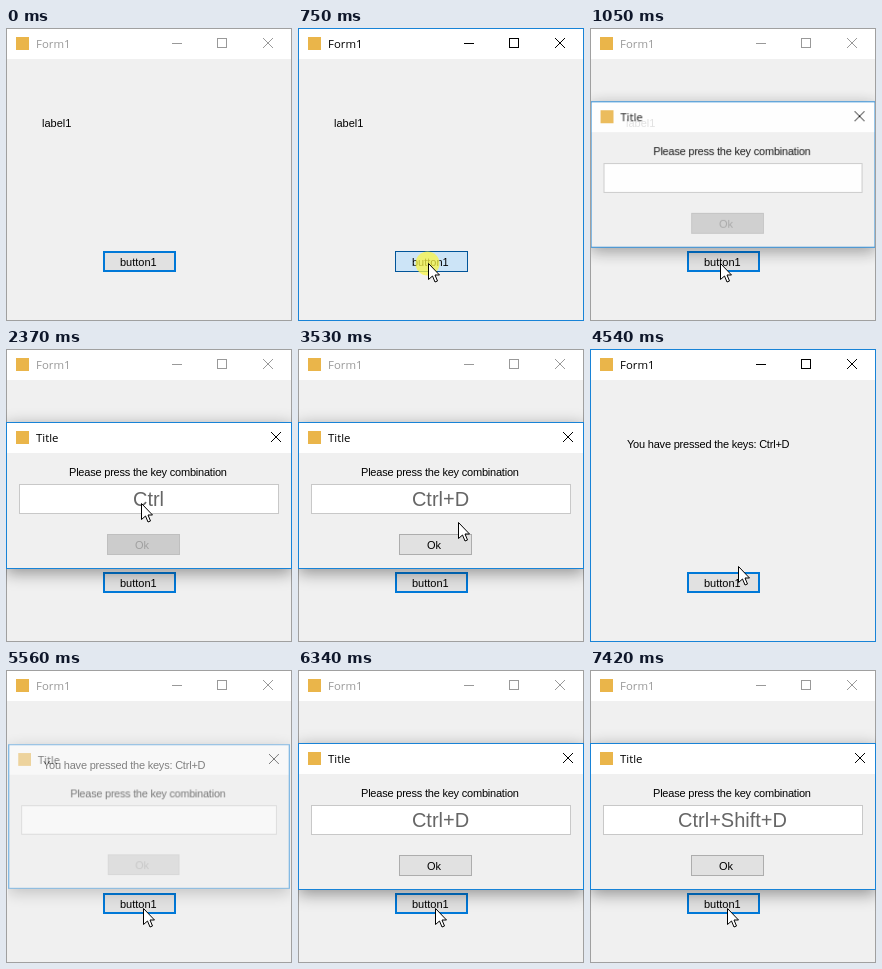
Recreate the animation shown at these times as an HTML page with a canvas. Size 286 by 293 pixels, loop 8000 ms.

```html
<!DOCTYPE html>
<html lang="en">
<head>
<meta charset="utf-8">
<title>Key combination dialog</title>
<style>
html, body { margin: 0; width: 286px; height: 293px; overflow: hidden; }
canvas { display: block; }
</style>
</head>
<body>
<canvas id="stage" width="286" height="293"></canvas>
<script>
const W = 286, H = 293, LOOP = 8000;
const stage = document.getElementById('stage').getContext('2d');
const layer = new OffscreenCanvas(W, H).getContext('2d');
let g = stage;

const SANS = '"Liberation Sans", Arial, sans-serif';
const SMALL = '11px ' + SANS, BIG = '20px ' + SANS;
const TITLE = '11.4px "Open Sans", "Noto Sans", sans-serif';
const BLUE = '#0078d7', FACE = '#f0f0f0';

// The screen refreshes on a fixed beat; everything below is timed in beats.
const BEAT = 77.6, FIRST = 186;
const beatAt = ms => Math.floor((ms - FIRST) / BEAT);

const CLICK = { open: 7, ok: 48, reopen: 65 };
const OPEN = 8.7, CLOSE = 49.2, REOPEN = 67.7, FADE = 2.6;
const moves = [
  { from: 0, to: 5, x: 130, y: 235 },
  { from: 14, to: 22, x: 135, y: 154 },
  { from: 42, to: 44, x: 184, y: 191 },
  { from: 45, to: 47, x: 150, y: 189 },
  { from: 53, to: 56, x: 148, y: 217 },
  { from: 61, to: 63, x: 137, y: 238 }
];
const typed = { 28: 'Ctrl', 34: 'Ctrl+D', 52: '', 79: 'Ctrl+D', 89: 'Ctrl+Shift', 93: 'Ctrl+Shift+D' };

const clamp = v => Math.max(0, Math.min(1, v));
const ease = u => u * u * (3 - 2 * u);
const within = (v, a, b) => v >= a && v < b;

function pointerAt(beat) {
  let x = 167, y = 270;
  for (const m of moves) {
    const k = ease(clamp((beat - m.from) / (m.to - m.from)));
    x += (m.x - x) * k;
    y += (m.y - y) * k;
  }
  return [Math.round(x), Math.round(y)];
}

function dialogAlpha(beat) {
  const ramp = start => clamp((beat - start) / FADE);
  return ramp(OPEN) - ramp(CLOSE) + ramp(REOPEN);
}

function keysAt(beat) {
  const last = Object.keys(typed).filter(at => at <= beat).pop();
  return typed[last] || '';
}

function box(x, y, w, h, fill, edge, line = 1) {
  g.fillStyle = edge;
  g.fillRect(x, y, w, h);
  g.fillStyle = fill;
  g.fillRect(x + line, y + line, w - 2 * line, h - 2 * line);
}

function text(str, x, y, font, color = '#000', align = 'left', spacing = 0) {
  g.font = font;
  g.fillStyle = color;
  g.textAlign = align;
  g.letterSpacing = spacing + 'px';
  g.fillText(str, x, y);
}

const label = (str, x, y) => text(str, x, y, SMALL, '#000', 'left', -0.21);

function cross(x, y) {
  g.beginPath();
  g.moveTo(x, y);
  g.lineTo(x + 10, y + 10);
  g.moveTo(x + 10, y);
  g.lineTo(x, y + 10);
  g.stroke();
}

function titleBar(y, name, ink) {
  g.fillStyle = '#fff';
  g.fillRect(1, y, W - 2, 30);
  g.fillStyle = '#eab54a';
  g.fillRect(10, y + 8, 13, 13);
  text(name, 30, y + 19, TITLE, ink);
  g.strokeStyle = ink;
  g.lineWidth = 1;
}

function button(name, x, y, textX, { enabled = true, focus, hover, pressed }) {
  let look = focus ? ['#e1e1e1', BLUE, 2] : ['#e1e1e1', '#adadad'];
  if (!enabled) look = ['#cccccc', '#bfbfbf'];
  else if (pressed) look = ['#cce4f7', '#005499'];
  else if (hover) look = ['#e5f1fb', BLUE];
  box(x, y, 73, 21, ...look);
  text(name, textX, y + 15, SMALL, enabled ? '#000' : '#a0a0a0');
}

function mainWindow(beat, hover, pressed) {
  const active = within(beat, CLICK.open, OPEN) || within(beat, CLOSE, REOPEN);
  const ink = active ? '#000' : '#999';
  box(0, 0, W, H, FACE, active ? '#1883d7' : '#a0a0a0');
  titleBar(1, 'Form1', ink);
  g.strokeRect(211.5, 10.5, 9, 9);
  g.fillStyle = ink;
  g.fillRect(166, 15, 10, 1);
  cross(257, 10);
  if (beat < CLOSE) text('label1', 36, 99, SMALL);
  else label('You have pressed the keys: Ctrl+D', 37, 99);
  button('button1', 97, 223, 114, { focus: true, hover, pressed });
}

function dialog(keys, hover, pressed) {
  g.shadowColor = 'rgba(0, 0, 0, 0.4)';
  g.shadowBlur = 15;
  g.shadowOffsetY = 4;
  g.fillRect(0, 73, W, 147);
  g.shadowColor = 'transparent';
  box(0, 73, W, 147, FACE, '#1883d7');
  titleBar(74, 'Title', '#000');
  cross(265, 83);
  label('Please press the key combination', 63, 127);
  box(13, 135, 260, 30, '#fff', '#c8c8c8');
  text(keys, 142.5, 157, BIG, '#666', 'center');
  button('Ok', 101, 185, 129, { enabled: keys.endsWith('D'), hover, pressed });
}

// Paints on the layer, then blends it as one sheet that grows while fading in
function fadeIn(alpha, paint) {
  g = layer;
  g.clearRect(0, 0, W, H);
  paint();
  g = stage;
  const scale = 1 - 0.033 * (1 - alpha);
  const w = W * scale, h = H * scale;
  g.globalAlpha = alpha;
  g.drawImage(layer.canvas, (W - w) / 2, (H - h) / 2, w, h);
  g.globalAlpha = 1;
}

function glow(x, y) {
  g.fillStyle = 'rgba(250, 246, 70, 0.75)';
  g.beginPath();
  g.arc(x - 0.5, y + 0.5, 12, 0, 2 * Math.PI);
  g.fill();
}

function pointer(x, y) {
  g.beginPath();
  [[0, 0], [0, 16], [4, 12.5], [6.5, 18.5], [9, 17.5], [6.5, 11.5], [11, 11.5]]
    .forEach(([dx, dy]) => g.lineTo(x + dx + 0.5, y + dy + 0.5));
  g.closePath();
  g.fillStyle = '#fff';
  g.fill();
  g.strokeStyle = '#000';
  g.lineWidth = 1;
  g.stroke();
}

function draw(ms) {
  const beat = beatAt(ms % LOOP);
  const [x, y] = pointerAt(beat);
  const alpha = dialogAlpha(beat);
  const click = Object.values(CLICK).some(at => within(beat, at, at + 2));
  const overMain = !alpha && within(x, 97, 170) && within(y, 223, 244);
  const overOk = within(x, 101, 174) && within(y, 185, 206);

  mainWindow(beat, overMain, overMain && click);
  if (alpha) fadeIn(alpha, () => dialog(keysAt(beat), overOk, overOk && click));
  if (click) glow(x, y);
  if (beat >= 0) pointer(x, y);
}

const start = performance.now();
function tick() {
  draw(performance.now() - start);
  requestAnimationFrame(tick);
}
tick();
</script>
</body>
</html>
```
